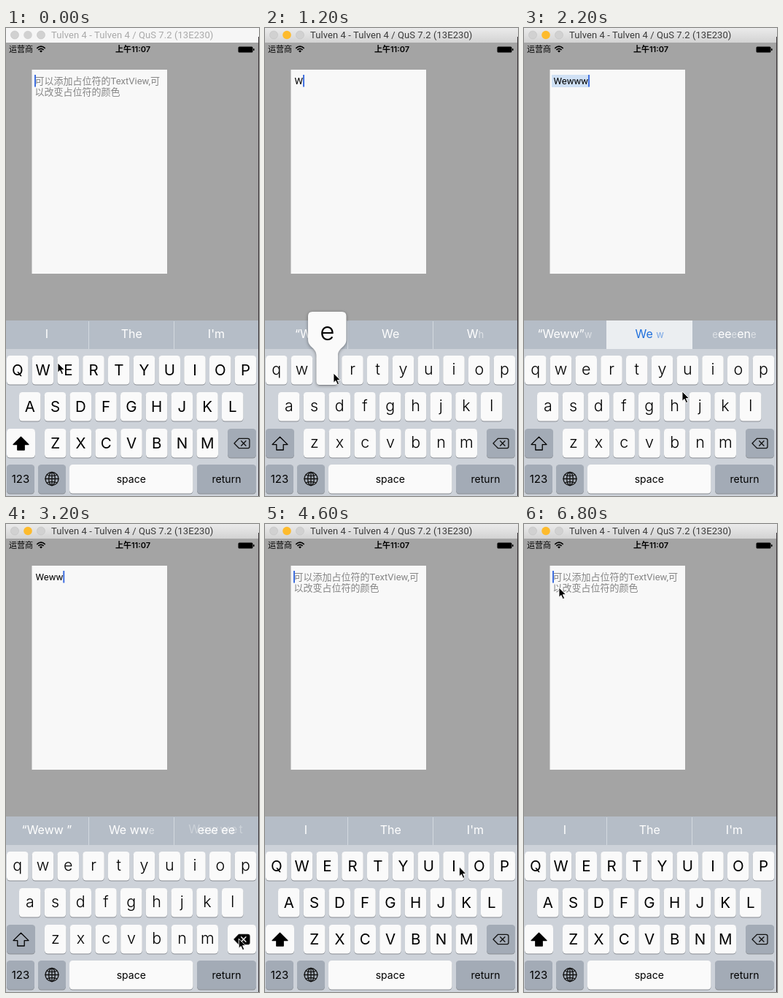
An HTML page that plays this animation: 347 px wide and 640 px high, repeating every 7000 ms.

```html
<!DOCTYPE html>
<html lang="zh">
<head>
<meta charset="utf-8">
<style>
html, body { margin: 0; width: 100%; height: 100%; overflow: hidden; background: #a4a4a4; }
svg { display: block; width: 347px; height: 640px; font-family: Inter, "Noto Sans CJK SC", "Noto Sans CJK", sans-serif; }
text { white-space: pre; }
.mid { text-anchor: middle; }
.key { fill: #fafafa; }
.dark { fill: #a3abb6; }
.edge { fill: #898d93; }
.line { fill: none; stroke: #111; stroke-width: 1.3; stroke-linejoin: round; stroke-linecap: round; }
.cell { font-size: 16px; fill: #fff; }
.field { font: 13px Roboto, "Noto Sans CJK SC", "Noto Sans CJK", sans-serif; }
#pop { filter: drop-shadow(0 1px 2px rgba(0, 0, 0, .4)); }
</style>
</head>
<body>
<svg viewBox="0 0 347 640">
  <defs>
    <linearGradient id="bar" x2="0" y2="1">
      <stop stop-color="#ebebeb"/><stop offset="1" stop-color="#d3d3d3"/>
    </linearGradient>
  </defs>
  <rect width="347" height="640" fill="#a4a4a4"/>

  <rect id="title" width="347" height="20"/>
  <circle cx="12" cy="9.5" r="5.5" fill="#d1d1d1" stroke="#c2c2c2" stroke-width=".6"/>
  <circle id="light" cx="30" cy="9.5" r="5.8"/>
  <circle cx="48" cy="9.5" r="5.5" fill="#d1d1d1" stroke="#c2c2c2" stroke-width=".6"/>
  <text id="name" class="field" x="62" y="14" letter-spacing=".08">Tulven 4 - Tulven 4 / QuS 7.2 (13E230)</text>

  <text x="4" y="33" font-size="11">运营商</text>
  <g fill="none" stroke="#000" stroke-width="1.6">
    <path d="M42.3 27.8Q48 22.6 53.7 27.8M44.3 30Q48 26.7 51.7 30"/>
    <path d="M46 31.4Q48 29.8 50 31.4L48 33.4Z" fill="#000" stroke="none"/>
  </g>
  <text class="mid" x="174" y="33" font-size="11" font-weight="600">上午11:07</text>
  <rect x="318.5" y="25.5" width="20" height="8" rx="1.5" fill="#000"/>
  <rect x="339" y="28" width="1.6" height="3" rx=".7" fill="#000"/>

  <rect x="35.5" y="57" width="185.5" height="279" fill="#f8f8f8"/>
  <g id="hint" class="field" fill="#858585">
    <text x="39.5" y="76.5">可以添加占位符的TextView,可</text>
    <text x="39.5" y="92">以改变占位符的颜色</text>
  </g>
  <rect id="mark" x="38" y="64" height="17" fill="#cfe0f4"/>
  <text id="typed" class="field" x="40.5" y="77"></text>
  <rect id="caret" y="64" width="2" height="16.5" fill="#3f6fe0"/>

  <rect y="400" width="347" height="39" fill="#b5bdc7"/>
  <path d="M113.5 401V439M230.5 401V439" stroke="#d3d9df" stroke-width="1"/>
  <rect id="pick" x="113" y="400" width="118" height="39" fill="#ebeef1"/>
  <g id="cells"></g>
  <rect y="439" width="347" height="201" fill="#cdd2d9"/>
  <g id="keys"></g>
  <path id="arrow" d="M20.5 559.3L31 569.6H25.2V577H15.8V569.6H10Z" stroke="#000" stroke-width="1.3" stroke-linejoin="round"/>
  <path id="erase" d="M319.6 561.3H331.5Q334 561.3 334 563.8V572.2Q334 574.7 331.5 574.7H319.6L313 568Z" class="line"/>
  <path id="cross" d="M322.7 564.8L329 571.2M329 564.8L322.7 571.2" class="line"/>
  <g class="line" stroke-width="1.1">
    <circle cx="63" cy="616.5" r="9"/>
    <ellipse cx="63" cy="616.5" rx="4.3" ry="9"/>
    <path d="M63 607.5V625.5M54 616.5H72M56 611Q63 614.3 70 611M56 622Q63 618.7 70 622"/>
  </g>
  <g id="pop">
    <path d="M-11.5 394Q-11.5 388 -5.5 388H35Q41 388 41 394V426C41 437 29.5 437 29.5 448V483.5Q29.5 488 25 488H4.5Q0 488 0 483.5V448C0 437 -11.5 437 -11.5 426Z" fill="#fafafa"/>
    <text id="big" class="mid" x="15" y="427" font-size="35" font-weight="300"></text>
  </g>
  <path id="mouse" d="M0 0V13.2L3 10.4L5.3 15.6L7.6 14.6L5.3 9.6H9.5Z" stroke="#fff" stroke-width=".9"/>
  <rect x="346" y="12" width="1" height="628" fill="#3c363a"/>
</svg>
<script>
const $ = id => document.getElementById(id);
const LOOP = 7000, TICK = 200, STEP = 34.75;
const START = ['I', 'The', "I'm"];

// From tick on: typed text, pressed key, suggestions ("~" toggles faded letters, "|" adds a ghost)
const states = [
  [0, '', '', START],
  [4, '', 'W', START],
  [5, 'W', '', ['“W~”', 'W~e', 'W~h']],
  [6, 'W', 'e', ['“W”', 'We', 'W~h']],
  [7, 'We', 'w', ['“We”', 'We~r', 'We~ll']],
  [8, 'Wew', 'w', ['“Wew”', 'We ~w', 'Wee~d']],
  [9, 'Weww', 'w', ['“Weww”', 'We w~w', 'ee~ee']],
  [10, 'Wewww', '', ['“Weww~w~”', 'We ~w', 'ee~ee']],
  [11, 'Wewww', '', ['“Weww”~w', 'We ~w', '~e~ee~e~en~e']],
  [12, 'Wewww', '', ['“Wewww”', 'We', 'eee ene']],
  [15, 'Wewww', '<', ['“Wewww”', 'We', 'eee ene']],
  [16, 'Weww', '<', ['“Weww ”', 'We ww~e', 'eee ee|Wewwet']],
  [17, 'Weww', '', ['“Weww”', 'We ww', 'eee ee']],
  [18, 'Wew', '<', ['“Wew”', 'We w', 'Wee~d']],
  [19, 'We', '<', ['“We”', 'We', 'We~ll']],
  [20, 'W', '', ['“W”', 'We', 'What']],
  [21, 'W', '<', ['“W”', 'We', 'What']],
  [22, '', '', START]
];

// Pointer stops: tick, x, y
const path = [
  [0, 71, 458], [3, 52, 472], [5, 54, 473], [6, 94, 472], [7, 54, 472], [9, 55, 473],
  [11, 217, 497], [14, 319, 567], [22, 320, 567], [27, 52, 76], [34, 48, 87]
];

function add(parent, tag, attrs, label = '') {
  const el = document.createElementNS('http://www.w3.org/2000/svg', tag);
  for (const k in attrs) el.setAttribute(k, attrs[k]);
  el.textContent = label;
  parent.append(el);
  return el;
}

function addKey(x, y, w, cls = 'key') {
  add($('keys'), 'rect', { x, y: y + 1, width: w, height: 39.5, rx: 4.5, class: 'edge' });
  return add($('keys'), 'rect', { x, y, width: w, height: 39.5, rx: 4.5, class: cls });
}

const letters = [], keyX = {};
[['QWERTYUIOP', 1, 448], ['ASDFGHJKL', 18, 498], ['ZXCVBNM', 53, 548]].forEach(([row, x0, y]) =>
  [...row].forEach((ch, i) => {
    const x = x0 + i * STEP;
    keyX[ch] = x;
    addKey(x, y, 29.5);
    letters.push([ch, y, add($('keys'), 'text', { x: x + 14.8, class: 'mid' })]);
  }));
const shift = addKey(1, 548, 39), del = addKey(304, 548, 39);
[['123', 1, 38, 'dark', 15], ['', 44, 38, 'dark', 15], ['space', 87, 169.5, 'key', 14], ['return', 262, 81, 'dark', 14]]
  .forEach(([label, x, w, cls, size]) => {
    addKey(x, 597, w, cls);
    add($('keys'), 'text', { x: x + w / 2, y: 621.5, class: 'mid', 'font-size': size }, label);
  });

const show = (el, on) => el.setAttribute('visibility', on ? 'visible' : 'hidden');

function drawCells(cells, picked) {
  $('cells').textContent = '';
  cells.forEach((cell, i) => {
    const x = 56 + i * 116.2;
    const [main, ghost] = cell.split('|');
    if (ghost) add($('cells'), 'text', { x, y: 423, class: 'cell mid', opacity: .3, 'font-size': 13, 'letter-spacing': 2 }, ghost);
    const el = add($('cells'), 'text', { x, y: 423.5, class: 'cell mid' });
    if (picked && i === 1) el.style.fill = '#2070dd';
    main.split('~').forEach((part, n) =>
      add(el, 'tspan', n % 2 ? { 'fill-opacity': .55, style: 'font-size:13px' } : {}, part));
  });
}

function drawPointer(tick) {
  const n = Math.max(1, path.findIndex(p => p[0] >= tick));
  const [a, b] = [path[n - 1], path[n]];
  const k = (tick - a[0]) / (b[0] - a[0]);
  const at = i => a[i] + (b[i] - a[i]) * k;
  $('mouse').setAttribute('transform', `translate(${at(1)} ${at(2)})`);
}

function draw(tick) {
  const [, text, press, cells] = states.filter(s => s[0] <= tick).pop();
  const caps = !text, picked = text === 'Wewww', erasing = press === '<';

  $('title').setAttribute('fill', tick ? 'url(#bar)' : '#f6f6f6');
  $('light').setAttribute('fill', tick ? '#fdbb2d' : '#d1d1d1');
  $('name').setAttribute('fill', tick ? '#3a3a3a' : '#a9a9a9');

  $('typed').textContent = text;
  const end = text ? 40.5 + $('typed').getComputedTextLength() : 39;
  $('caret').setAttribute('x', end);
  $('mark').setAttribute('width', end - 37);
  show($('hint'), caps);
  show($('mark'), picked);
  show($('pick'), picked);
  drawCells(cells, picked);

  for (const [ch, y, el] of letters) {
    el.textContent = caps ? ch : ch.toLowerCase();
    el.setAttribute('y', y + (caps ? 27.3 : 26.3));
    el.setAttribute('font-size', caps ? 20.5 : 21.5);
    el.setAttribute('font-weight', caps ? 400 : 300);
  }
  shift.setAttribute('class', caps ? 'key' : 'dark');
  $('arrow').setAttribute('fill', caps ? '#000' : 'none');
  del.setAttribute('class', erasing ? 'key' : 'dark');
  $('erase').style.fill = erasing ? '#000' : 'none';
  $('cross').style.stroke = erasing ? '#fff' : '#111';

  const popped = press && !erasing;
  show($('pop'), popped);
  if (popped) {
    $('pop').setAttribute('transform', `translate(${keyX[press.toUpperCase()]} 0)`);
    $('big').textContent = press;
  }
  drawPointer(tick);
}

let last = -1;
function loop() {
  const tick = Math.floor(performance.now() % LOOP / TICK);
  if (tick !== last) draw(last = tick);
  requestAnimationFrame(loop);
}
loop();
</script>
</body>
</html>
```
